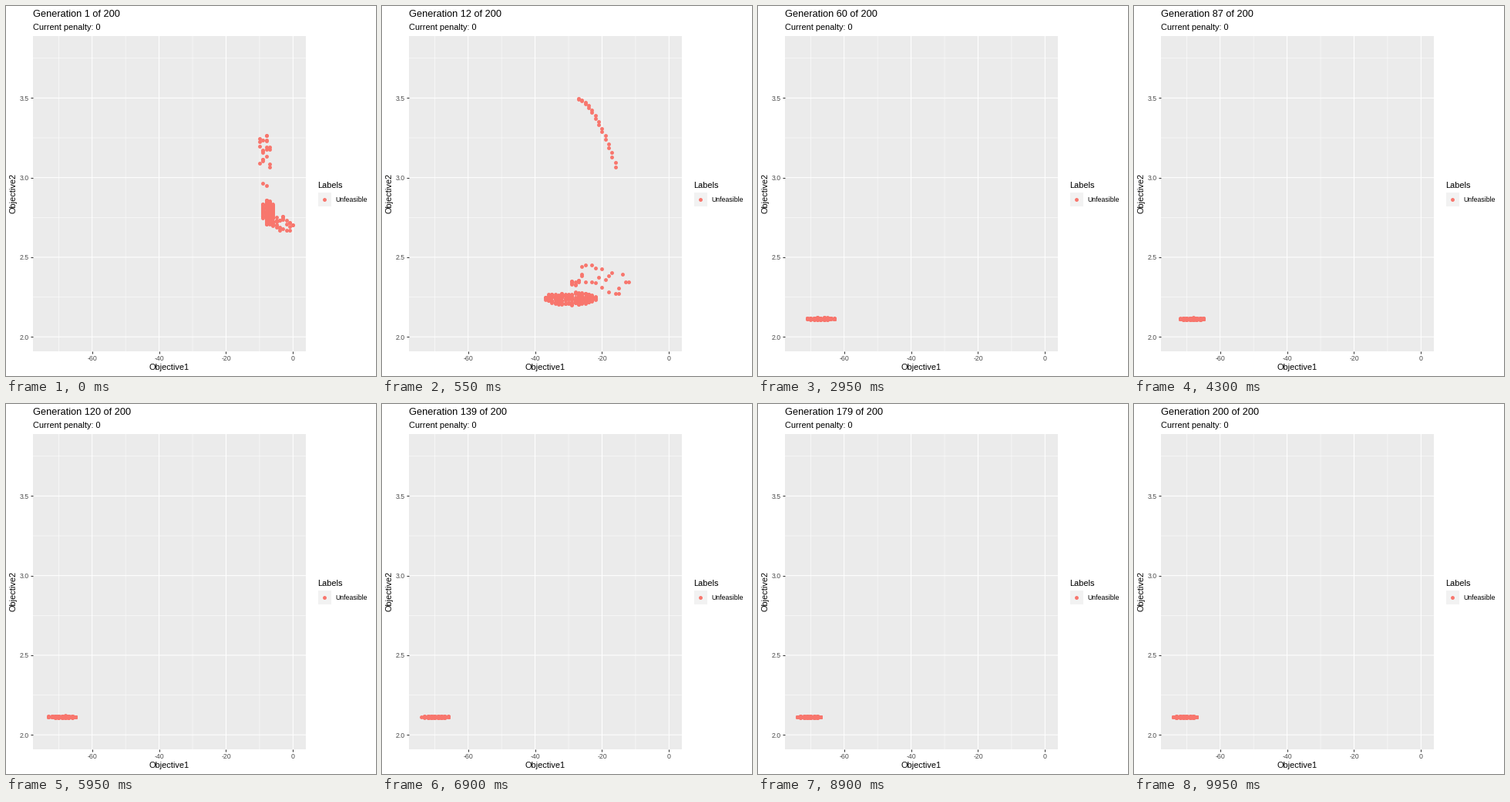
A matplotlib script for the animation above (10 s loop, 480 px wide and 480 px high).

```python
import matplotlib.pyplot as plt
import numpy as np
from matplotlib.animation import FuncAnimation
from matplotlib.patches import Rectangle

SIZE, DPI = 480, 72
GENERATIONS = 200
HOLD = 4  # generations an individual keeps its height
CORAL = "#F8766D"
LEFT, RIGHT, TOP, BOTTOM = 34.8, 388.55, 38.5, 447.9
X_LIM, Y_LIM = (-77.7, 3.73), (1.9095, 3.8915)
DOT_AREA = 4.9 ** 2

plt.rcParams["font.family"] = "Liberation Sans"
plt.rcParams["axes.unicode_minus"] = False


class Swarm:
    """Individuals scattered in a box that moves between a few key generations."""

    def __init__(self, count, seed, skew, gens, left, right, low, high,
                 deaths=None):
        rng = np.random.default_rng(seed)
        self.gens = gens
        self.edges = (left, right, low, high)
        self.u = np.linspace(0, 1, count) ** skew
        self.heights = rng.random((GENERATIONS // HOLD + 2, count))
        self.phase = rng.integers(0, HOLD, count)
        self.last = (rng.uniform(*deaths, count) if deaths
                     else np.full(count, GENERATIONS))

    def mix(self, gen, v):
        """Relative height: an ellipse that narrows to both ends."""
        return 0.5 + (v - 0.5) * np.sqrt(4 * self.u * (1 - self.u))

    def at(self, gen):
        left, right, low, high = (np.interp(gen, self.gens, edge)
                                  for edge in self.edges)
        rows = (gen + self.phase) // HOLD
        v = self.heights[rows, np.arange(len(self.u))]
        x = np.round(left + (right - left) * self.u)
        y = low + (high - low) * self.mix(gen, v)
        return np.column_stack([x, y])[self.last >= gen]


class Front(Swarm):
    """Starts as a loose cloud and settles into a falling curve."""

    def mix(self, gen, v):
        settled = min(1, (gen - 1) / 11)
        return (1 - settled) * np.sqrt(v) + settled * (1 - self.u ** 1.7)


swarms = [
    Swarm(190, 4, 0.85,
          gens=[1, 12, 36, 60, 87, 120, 158],
          left=[-9, -37, -65, -71, -72, -73, -74],
          right=[-6, -22, -52, -63, -65, -65, -67],
          low=[2.70, 2.20, 2.113, 2.108, 2.107, 2.107, 2.107],
          high=[2.865, 2.285, 2.137, 2.121, 2.120, 2.120, 2.118]),
    Swarm(34, 9, 1.7,
          gens=[1, 12, 36, 48],
          left=[-6, -29, -41, -52], right=[0, -12, -36, -47],
          low=[2.65, 2.22, 2.160, 2.135], high=[2.76, 2.47, 2.180, 2.145],
          deaths=(38, 49)),
    Front(24, 7, 1,
          gens=[1, 12, 26],
          left=[-10, -27, -37], right=[-7, -16, -26],
          low=[2.93, 3.066, 3.34], high=[3.265, 3.495, 3.80],
          deaths=(15, 28)),
]

fig = plt.figure(figsize=(SIZE / DPI, SIZE / DPI), dpi=DPI, facecolor="white")

# Full-page layer in pixel coordinates for titles and legend
page = fig.add_axes([0, 0, 1, 1])
page.set_xlim(0, SIZE)
page.set_ylim(SIZE, 0)
page.axis("off")


def label(x, y, text, size, **style):
    return page.text(x, y, text, fontsize=size, color="black", **style)


title = label(34.8, 14, "", 12.8)
label(34.8, 31, "Current penalty: 0", 11)
label((LEFT + RIGHT) / 2, 472, "Objective1", 11, ha="center")
label(13, (TOP + BOTTOM) / 2, "Objective2", 11, rotation=90,
      rotation_mode="anchor", ha="center", va="baseline")
label(404.4, 236, "Labels", 11)
label(427.8, 254, "Unfeasible", 8.8)
page.add_patch(Rectangle((404.6, 242.2), 17.3, 17.3, fc="#F2F2F2", lw=0))
page.scatter([413.4], [250.8], s=DOT_AREA, c=CORAL, lw=0)

ax = fig.add_axes([LEFT / SIZE, 1 - BOTTOM / SIZE,
                   (RIGHT - LEFT) / SIZE, (BOTTOM - TOP) / SIZE])
ax.set_facecolor("#EBEBEB")
ax.set_xlim(*X_LIM)
ax.set_ylim(*Y_LIM)
ax.spines[:].set_visible(False)
x_ticks, y_ticks = np.arange(-60, 1, 20), np.arange(2, 3.6, 0.5)
ax.set_xticks(x_ticks, [f"{x}" for x in x_ticks])
ax.set_yticks(y_ticks, [f"{y:.1f}" for y in y_ticks])
ax.set_xticks(x_ticks - 10, minor=True)
ax.set_yticks(y_ticks + 0.25, minor=True)
ax.tick_params(length=2.75, width=1.07, color="#333333", pad=2.2,
               labelsize=8.8, labelcolor="#4D4D4D")
ax.tick_params(which="minor", length=0)
ax.set_axisbelow(True)
ax.grid(which="major", color="white", lw=1.07, snap=False)
ax.grid(which="minor", color="white", lw=0.53, snap=False)
dots = ax.scatter([], [], s=DOT_AREA, c=CORAL, lw=0, zorder=3)


def draw(frame):
    gen = frame + 1
    title.set_text(f"Generation {gen} of {GENERATIONS}")
    dots.set_offsets(np.vstack([swarm.at(gen) for swarm in swarms]))
    return title, dots


anim = FuncAnimation(fig, draw, frames=GENERATIONS, interval=50,
                     repeat=True, repeat_delay=0, blit=False)
plt.show()
```
